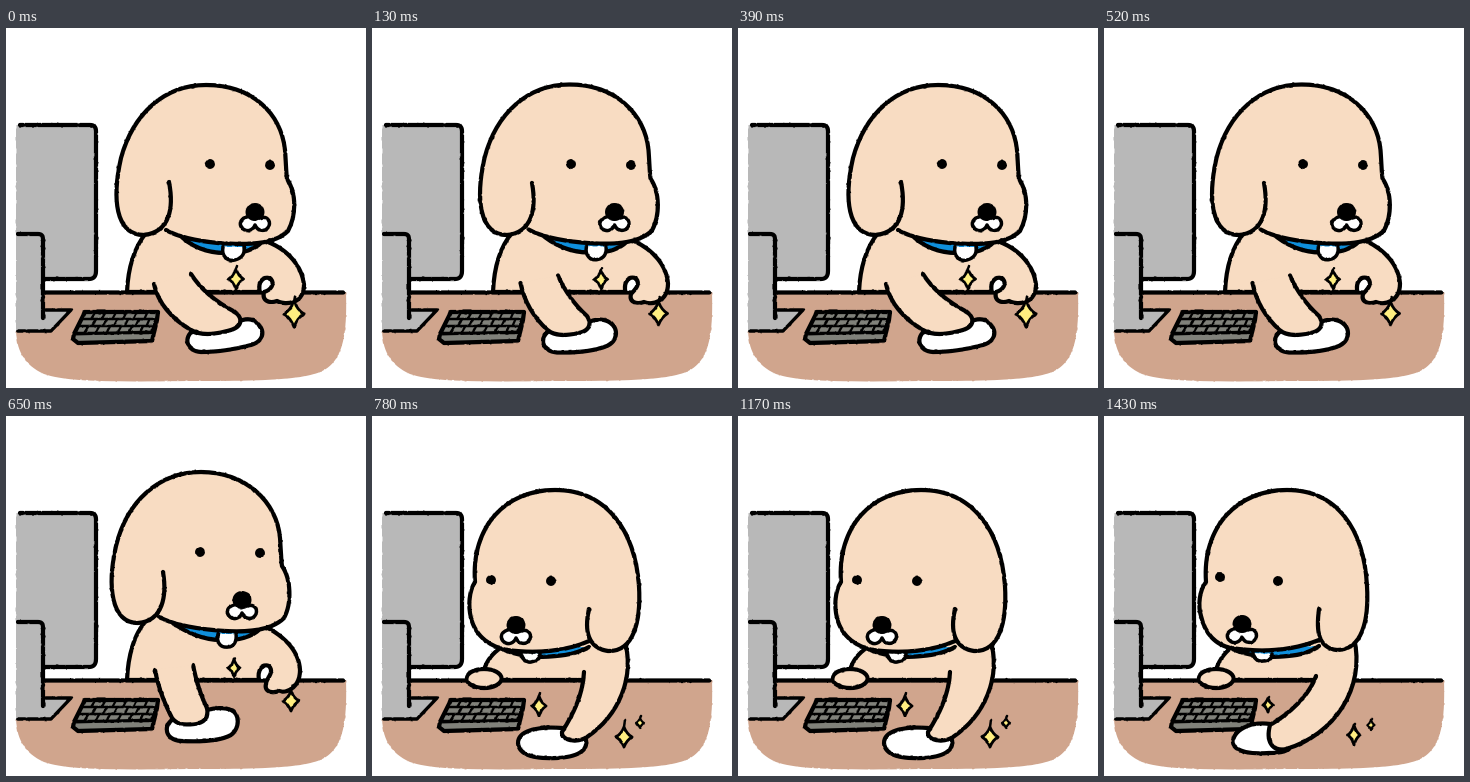
An HTML page with a canvas for the animation above (1.56 s loop, 360 by 360 pixels).

```html
<!DOCTYPE html>
<html lang="en">
<head>
<meta charset="utf-8">
<title>Dog at a desk</title>
<style>
html, body { margin: 0; width: 100%; height: 100%; overflow: hidden; background: #fff; }
canvas { display: block; width: 100vw; height: 100vh; }
svg { position: absolute; width: 0; height: 0; }
</style>
</head>
<body>
<svg aria-hidden="true">
  <filter id="rough" x="0" y="0" width="100%" height="100%" color-interpolation-filters="sRGB">
    <feTurbulence type="fractalNoise" baseFrequency=".12" numOctaves="1" seed="4"/>
    <feDisplacementMap in="SourceGraphic" scale="3" xChannelSelector="R" yChannelSelector="G"/>
  </filter>
</svg>
<canvas id="stage" width="720" height="720"></canvas>
<script>
const stage = document.getElementById('stage').getContext('2d');
const sheet = document.createElement('canvas');
sheet.width = sheet.height = 720;
const ctx = sheet.getContext('2d');

const INK = '#000', FUR = '#f8dcc2', GREY = '#b8b8b8', DESK = '#d0a58d',
      BLUE = '#0f8fdc', YELLOW = '#ffee80', KEYS = '#80817a';
const STEP = 130, LOOP = 1560, LINE = 4.2;

// Each shape holds its first and last pose.
const mousing = {
  body: [
    'M150 195 L140 205 C128 220 122 240 121 264 L254 264 C251 253 259 247 265 251 C269 256 265 262 258 264 C256 272 262 276 271 273 C278 277 298 277 298 257 C296 238 282 222 262 214',
    'M150 195 L140 205 C128 218 122 240 121 264 L253 264 C251 254 257 247 263 250 C269 257 260 262 260 268 C258 275 265 278 273 275 C281 278 294 271 294 254 C293 236 280 222 262 212'],
  mouse: [
    'M188 302 C177 309 180 323 195 324 C213 324 230 321 245 317 C258 313 259 303 252 296 C246 289 238 291 231 294',
    'M168 303 C157 308 158 324 175 325 C195 326 214 325 225 319 C234 312 234 298 225 294 C218 291 208 292 201 294'],
  arm: [
    'M148 256 C152 275 166 291 185 302 C195 308 210 306 221 303 C236 300 238 291 229 284 C212 275 195 262 185 246',
    'M149 254 C153 275 160 290 166 302 C171 309 179 309 188 308 C198 307 203 302 201 292 C195 280 190 264 187 249'],
  collar: [
    'M172 205 C184 219 202 225 219 225 C236 226 248 222 256 214',
    'M164 205 C180 217 198 224 215 224 C232 225 246 221 254 213'],
  tag: [
    'M217 219 C215 228 222 234 229 232 C236 230 239 226 238 219',
    'M212 218 C210 227 215 232 222 231 C228 231 231 225 230 218'],
  head: [
    'M163 154 C168 180 164 204 138 207 C109 207 106 170 115 130 C127 86 158 57 200 57 C246 57 275 85 279 122 C280 135 280 143 281 151 C291 166 290 188 282 203 C268 217 240 217 212 215 C192 213 172 209 160 202',
    'M157 156 C161 180 157 205 132 207 C105 207 101 170 110 130 C121 85 153 56 195 56 C240 56 271 86 274 122 C275 135 275 143 276 150 C285 163 286 187 278 202 C264 216 236 217 207 214 C186 212 166 208 153 201'],
  face: [[204, 136, 264, 137, 249, 184], [194, 136, 254, 137, 236, 184]],
  sparkles: [
    [[230, 251, 7.5, 10, 3], [288, 286, 10, 13, 4]],
    [[228, 252, 6, 8.5, 1], [285, 285, 8, 10, 5]]]
};

const typing = {
  body: [
    'M250 222 L130 231 C119 238 114 247 112 254 L112 264 L225 264',
    'M248 222 L128 231 C119 238 114 247 112 254 L112 264 L225 264'],
  mouse: [
    'M190 312 C165 310 146 315 146 327 C147 340 165 343 185 342 C205 341 216 335 214 324',
    'M166 308 C145 305 129 315 129 326 C130 337 150 338 165 337 C178 337 185 335 187 330'],
  arm: [
    'M212 256 C211 280 200 300 190 316 C189 324 204 328 215 321 C246 300 264 262 252 222',
    'M212 260 C205 280 185 298 166 309 C162 324 167 336 182 333 C230 319 262 272 250 222'],
  collar: [
    'M128 232 C146 241 168 242 184 240 C198 239 208 236 217 231',
    'M126 232 C145 241 168 242 184 240 C198 239 208 235 215 230'],
  tag: [
    'M149 237 C149 242 154 247 159 246 C165 245 168 242 168 238',
    'M149 237 C149 242 154 246 159 245 C165 245 168 242 168 238'],
  head: [
    'M217 193 C212 215 216 232 236 235 C262 236 269 205 267 170 C263 115 235 74 183 74 C134 74 99 110 103 166 C97 175 96 190 99 202 C104 222 120 231 135 234 C165 238 195 235 217 225',
    'M215 193 C212 215 214 232 233 234 C258 234 265 205 263 170 C260 113 233 74 183 74 C134 74 98 110 102 166 C95 175 94 190 97 200 C101 218 112 229 127 232 C160 237 190 234 215 224'],
  face: [[119, 164, 179, 165, 144, 209], [116, 161, 174, 165, 138, 208]],
  sparkles: [
    [[167, 290, 7, 10, 3], [252, 321, 8, 10, 7], [268, 307, 4, 5, 2]],
    [[164, 289, 5, 7, 1], [250, 319, 6, 10, 1], [267, 309, 3.5, 5, 1]]],
  paw: true
};

const lerp = (a, b, k) => a + (b - a) * k;
const lerpAll = (a, b, k) => a.map((v, i) => lerp(v, b[i], k));

function blend([a, b], k) {
  const ends = b.match(/[\d.]+/g);
  let i = 0;
  return a.replace(/[\d.]+/g, n => lerp(+n, +ends[i++], k));
}

function shape(d, fill, width = LINE) {
  const path = new Path2D(d);
  if (fill) {
    ctx.fillStyle = fill;
    ctx.fill(path);
  }
  if (width) {
    ctx.lineWidth = width;
    ctx.stroke(path);
  }
}

function oval(x, y, rx, ry, fill, outlined) {
  ctx.beginPath();
  ctx.ellipse(x, y, rx, ry, 0, 0, Math.PI * 2);
  ctx.fillStyle = fill;
  ctx.fill();
  ctx.lineWidth = LINE;
  if (outlined) ctx.stroke();
}

function keyboard() {
  shape('M79 284 L152 284 L151 292 L146 313 L72 315 L67 311 L68 306 Z', KEYS);
  shape('M68 306 L146 304 L152 285', null, 3);
  const left = v => 79 - 11 * v, right = v => 152 - 6 * v, row = v => 284 + 21 * v;
  for (let r = 0; r < 3; r++) {
    const top = r / 3, low = (r + 1) / 3;
    shape(`M${left(low)} ${row(low)} L${right(low)} ${row(low)}`, null, 2.4);
    for (let c = 1; c < 7; c++) {
      const u = (c + (r % 2) * 0.4) / 7;
      shape(`M${lerp(left(top), right(top), u)} ${row(top)} L${lerp(left(low), right(low), u) - 1} ${row(low)}`, null, 2.2);
    }
  }
}

function room() {
  ctx.fillStyle = '#fff';
  ctx.fillRect(0, 0, 360, 360);
  shape('M10 264 L340 264 C341 302 339 334 314 344 C292 353 240 353 180 353 C110 354 60 354 38 346 C18 337 10 322 10 300 Z', DESK, 0);
  shape('M38 264.5 L337 264.5');
  shape('M10 97 L84 97 Q90 97 90 103 L90 243 Q90 251 83 251 L10 251 Z', GREY, 0);
  shape('M14 97 L84 97 Q90 97 90 103 L90 243 Q90 251 83 251 L38 251');
  shape('M10 206 L37 206 L37 282 L65 282 L45 303 L10 303 Z', GREY, 0);
  shape('M12 206 L32 206 Q37 206 37 211 L37 290');
  shape('M40 282 L65 282 L45 303 L12 303', null, 3.4);
  keyboard();
}

function face([lx, ly, rx, ry, nx, ny]) {
  oval(lx, ly, 5, 5, INK);
  oval(rx, ry, 5, 5, INK);
  ctx.save();
  ctx.translate(nx, ny);
  shape('M-2 5 C-11 3 -18 10 -13 16 C-8 21 -2 18 0 13 C3 20 11 20 14 14 C16 8 11 4 6 6', '#fff', 3.5);
  oval(0, 0, 9.5, 9, INK);
  ctx.restore();
}

function sparkle([x, y, w, h, tail]) {
  const a = w * 0.32, b = h * 0.32;
  ctx.save();
  ctx.translate(x, y);
  shape(`M0 ${-h} Q${a} ${-b} ${w} 0 Q${a} ${b} 0 ${h} Q${-a} ${b} ${-w} 0 Q${-a} ${-b} 0 ${-h} Z`, YELLOW, w < 5 ? 2.2 : 2.8);
  shape(`M0 ${-h} l1 ${-tail}`, null, 2.5);
  ctx.restore();
}

function draw(scene, k) {
  room();
  const part = (name, fill, width) => shape(blend(scene[name], k), fill, width);
  part('body', FUR);
  if (scene.paw) oval(112, 262.5, 17.5, 9.5, FUR, true);
  part('mouse', '#fff');
  part('arm', FUR);
  part('collar', BLUE);
  part('tag', '#fff', 3.5);
  part('head', FUR);
  face(lerpAll(...scene.face, k));
  const [from, to] = scene.sparkles;
  from.forEach((s, i) => sparkle(lerpAll(s, to[i], k)));
  stage.drawImage(sheet, 0, 0);
}

ctx.scale(2, 2);
ctx.lineCap = ctx.lineJoin = 'round';
ctx.strokeStyle = INK;
stage.filter = 'url(#rough)';
let shown = -1;

function tick() {
  const step = Math.floor((performance.now() % LOOP) / STEP);
  if (step !== shown) {
    shown = step;
    draw(step < 6 ? mousing : typing, (step % 3) / 2);
  }
  requestAnimationFrame(tick);
}
tick();
</script>
</body>
</html>
```
